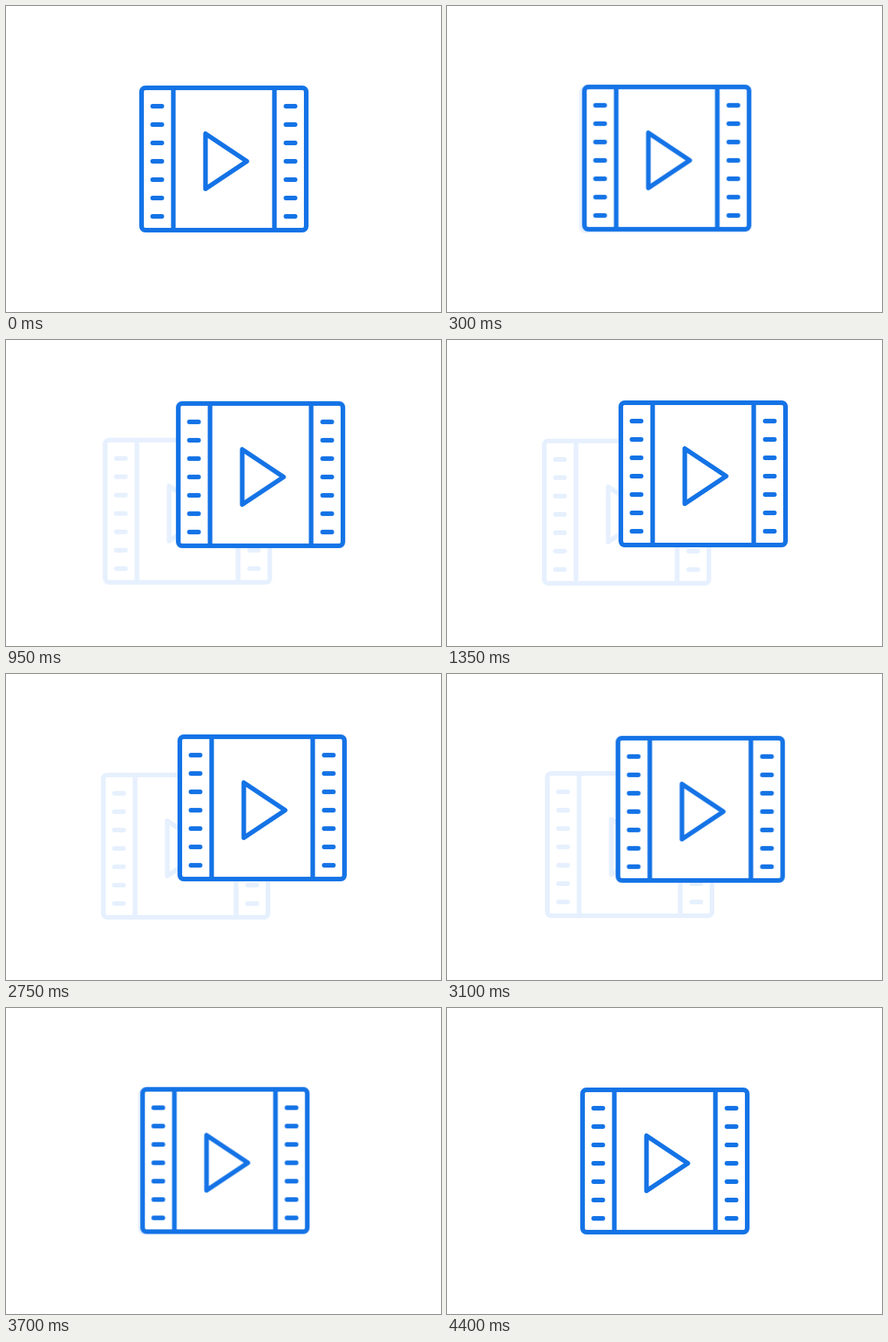
Animation, 568 px wide and 400 px high, one loop 5000 ms. Source, as an HTML page without scripts:

```html
<!DOCTYPE html>
<html lang="en">
<head>
<meta charset="utf-8">
<title>Film strip</title>
<style>
  html, body { margin: 0; width: 100%; height: 100%; overflow: hidden; background: #fff; }
  svg { display: block; width: 568px; height: 400px; }
  .film { fill: #fff; stroke-width: 6; stroke-linecap: round; stroke-linejoin: round; }
  .front { stroke: #1473e6; animation: front 5s infinite; }
  .back { stroke: #e6f0fe; animation: back 5s infinite; }

  /* slide apart, hold, slide together, rest */
  @keyframes front {
    0% { transform: none; animation-timing-function: cubic-bezier(.75, 0, .1, 1); }
    26% { transform: translate(50px, -25px); }
    54% { transform: translate(50px, -25px); animation-timing-function: cubic-bezier(.86, 0, .06, 1); }
    80%, 100% { transform: none; }
  }
  @keyframes back {
    0%, 1% { transform: none; animation-timing-function: cubic-bezier(.81, 0, .11, 1); }
    26% { transform: translate(-50px, 25px); }
    54% { transform: translate(-50px, 25px); animation-timing-function: cubic-bezier(.836, 0, .098, 1); }
    80%, 100% { transform: none; }
  }
</style>
</head>
<body>
<svg viewBox="0 0 568 400">
  <defs>
    <path id="holes" d="M191.5 131h12m-12 24h12m-12 24h12m-12 24h12m-12 24h12m-12 24h12m-12 24h12"/>
    <g id="film">
      <rect x="177" y="107" width="215" height="186" rx="5"/>
      <path d="M218.5 107v186M350.5 107v186"/>
      <use href="#holes"/>
      <use href="#holes" x="174"/>
      <path d="M260.5 167v72l54-36z"/>
    </g>
  </defs>
  <use class="film back" href="#film"/>
  <use class="film front" href="#film"/>
</svg>
</body>
</html>
```
